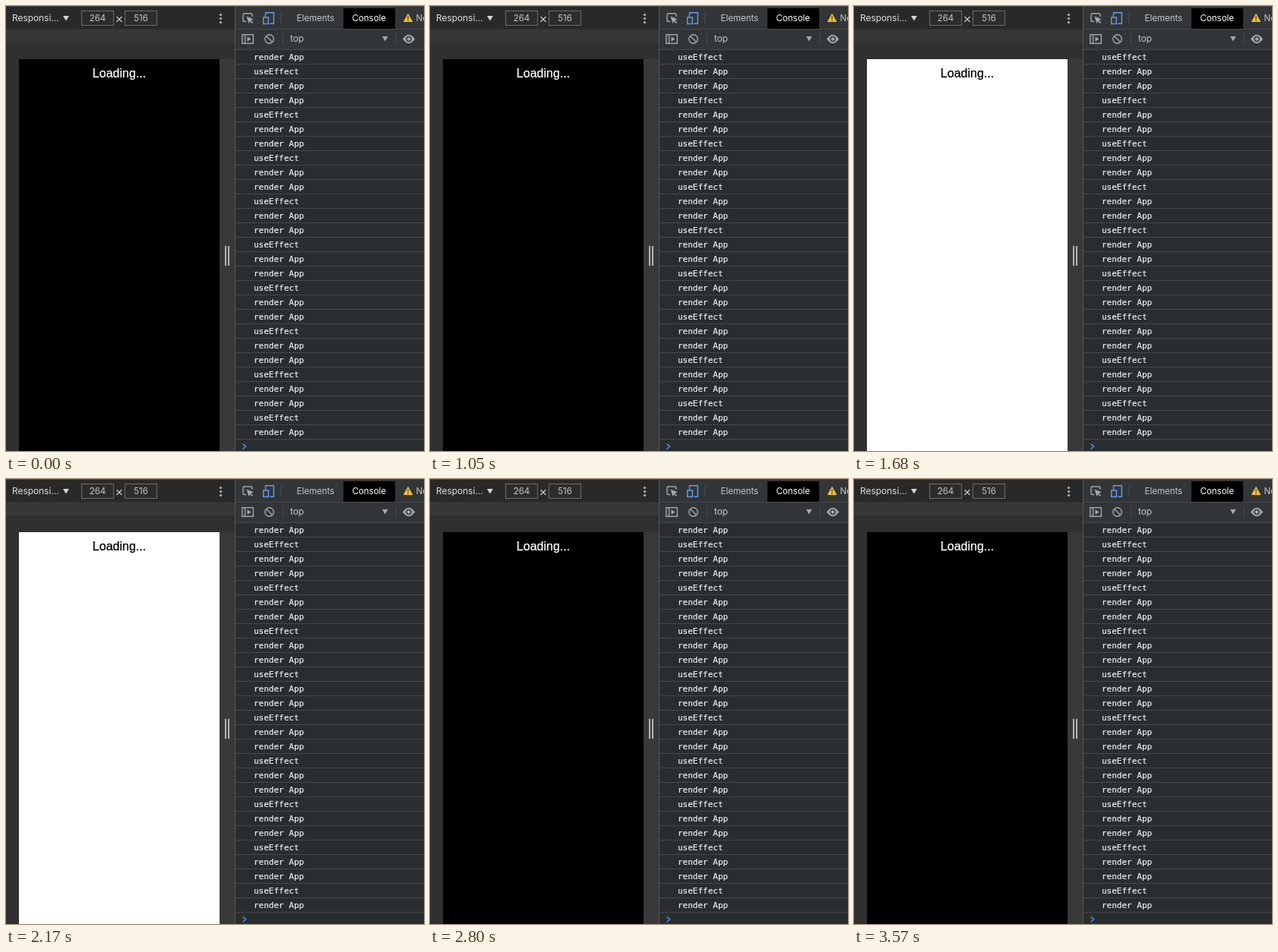
Animation, 550 px wide and 586 px high, one loop 3920 ms. Source, as an HTML page:

```html
<!DOCTYPE html>
<html lang="en">
<head>
<meta charset="utf-8">
<style>
  html, body { margin: 0; width: 100%; height: 100%; overflow: hidden; background: #303030; }
  svg { display: block; }
  text { white-space: pre; }
  .ui { font: 11.5px Inter, Roboto, sans-serif; fill: #c6c8ca; }
  .log { font: 11px "DejaVu Sans Mono", monospace; fill: #f0f1f2; stroke: #f0f1f2; stroke-width: .2; }
  .page { font: 16px "Liberation Sans", Arial, sans-serif; stroke-width: .25; }
  .icon { fill: none; stroke: #a5a8ab; stroke-width: 1.4; }
  .sep { stroke: #484b4e; }
  .field { fill: #2c2c2c; stroke: #6c6c6c; }
</style>
</head>
<body>
<svg width="550" height="586" viewBox="0 0 550 586">
  <!-- device pane -->
  <rect width="301" height="586" fill="#303030"/>
  <rect width="301" height="30" fill="#292929"/>
  <rect y="31" width="301" height="17" fill="#373737"/>
  <rect x="281" y="70" width="20" height="516" fill="#393939"/>
  <text class="ui" x="8" y="20" style="fill:#dedede;font-size:11.9px">Responsi…</text>
  <path d="M75 13h8l-4 6.5z" fill="#d5d5d5"/>
  <rect class="field" x="99.5" y="6.5" width="42" height="19"/>
  <rect class="field" x="156.5" y="6.5" width="42" height="19"/>
  <text class="ui" x="120.5" y="20" text-anchor="middle">264</text>
  <text class="ui" x="177.5" y="20" text-anchor="middle">516</text>
  <path d="M145.5 14l7 7m0-7l-7 7" stroke="#c8c8c8" stroke-width="1.3"/>
  <g fill="#b5b5b5">
    <circle cx="282.5" cy="11.5" r="1.6"/>
    <circle cx="282.5" cy="16.5" r="1.6"/>
    <circle cx="282.5" cy="21.5" r="1.6"/>
    <path d="M288 316h2v26h-2zM292 316h2v26h-2z"/>
  </g>
  <rect id="screen" x="17" y="70" width="264" height="516"/>
  <text id="label" class="page" x="149" y="94" text-anchor="middle">Loading...</text>

  <!-- tools pane -->
  <rect x="302" width="248" height="586" fill="#292d30"/>
  <rect x="302" width="248" height="57" fill="#333638"/>
  <rect x="444" y="3" width="68" height="27" fill="#000"/>
  <path d="M302 30.5h248" stroke="#484b4e"/>
  <path d="M301.5 0v586" stroke="#565656"/>
  <path d="M0 .5h550" stroke="#4a4a4a"/>
  <path class="sep" d="M361.5 9v14M364.5 36v14M513.5 36v14"/>

  <path class="icon" d="M316 20.5h-2.5q-1.5 0-1.5-1.5v-7.5q0-1.5 1.5-1.5h9q1.5 0 1.5 1.5v2.5"/>
  <path d="M316.5 13.5l9.5 4-3.8 1.3 3 3-1.3 1.3-3-3-1.4 3.4z" fill="#a5a8ab"/>
  <g class="icon" style="stroke:#5f9ded">
    <path d="M341.5 15v-6.3h10.8v14.6h-5"/>
    <rect x="338.7" y="15" width="6.6" height="8.5"/>
  </g>
  <text class="ui" x="382.5" y="20">Elements</text>
  <text class="ui" x="455.5" y="20" style="fill:#fff">Console</text>
  <path d="M529 10.5l5.5 10h-11z" fill="#f5c33b" stroke="#f5c33b" stroke-linejoin="round"/>
  <path d="M529 13.5v3.8m0 1.2v1.4" stroke="#333" stroke-width="1.4"/>
  <text class="ui" x="539.5" y="20">No</text>

  <rect class="icon" x="310.7" y="37.7" width="14.6" height="11.6"/>
  <path class="icon" d="M314.5 38v11"/>
  <path d="M317.5 40.2l5 3.3-5 3.3z" fill="#a5a8ab"/>
  <circle class="icon" cx="346.5" cy="43.5" r="5.7"/>
  <path class="icon" d="M342.5 39.5l8 8"/>
  <text class="ui" x="374" y="47" style="font-size:11.7px">top</text>
  <path d="M495 40h7.5l-3.7 6.5z" fill="#a5a8ab"/>
  <path d="M522 43.5q8-11.5 16 0q-8 11.5-16 0z" fill="#a5a8ab"/>
  <circle cx="530" cy="43.5" r="3" fill="#a5a8ab" stroke="#333638" stroke-width="1.5"/>

  <g id="rows"></g>
  <path d="M311.5 576.5l4 3.5-4 3.5" fill="none" stroke="#4a8df0" stroke-width="1.6"/>
</svg>
<script>
const LOOP = 3920, ROWS = 27, TOP = 57, PITCH = 19;
const FIRST = 420, PERIOD = 630, LAG = 70, TOGGLES = 6;

const byId = id => document.getElementById(id);
const add = (name, attrs) => {
  const el = document.createElementNS("http://www.w3.org/2000/svg", name);
  for (const key in attrs) el.setAttribute(key, attrs[key]);
  return byId("rows").appendChild(el);
};

const lines = [];
for (let i = 0; i <= ROWS; i++) {
  const y = TOP + i * PITCH;
  add("path", { d: `M302 ${y + .5}h248`, stroke: "#45494c" });
  if (i < ROWS) lines.push(add("text", { class: "log", x: 326, y: y + 14 }));
}

function draw(now) {
  const t = now % LOOP;
  const since = t - FIRST;
  const count = Math.floor(since / PERIOD) + 1;
  const light = count % 2 === 1;
  // A toggle logs one render, then its effect and second render shortly after;
  // the last one has logged nothing yet when the loop ends.
  const pending = count > 0 && count < TOGGLES && since % PERIOD < LAG;
  const effectRow = pending ? 0 : 1;

  byId("screen").setAttribute("fill", light ? "#fff" : "#000");
  const ink = light ? "#000" : "#fff";
  byId("label").setAttribute("fill", ink);
  byId("label").setAttribute("stroke", ink);
  lines.forEach((line, i) => {
    line.textContent = i % 3 === effectRow ? "useEffect" : "render App";
  });
  requestAnimationFrame(draw);
}
draw(performance.now());
</script>
</body>
</html>
```
